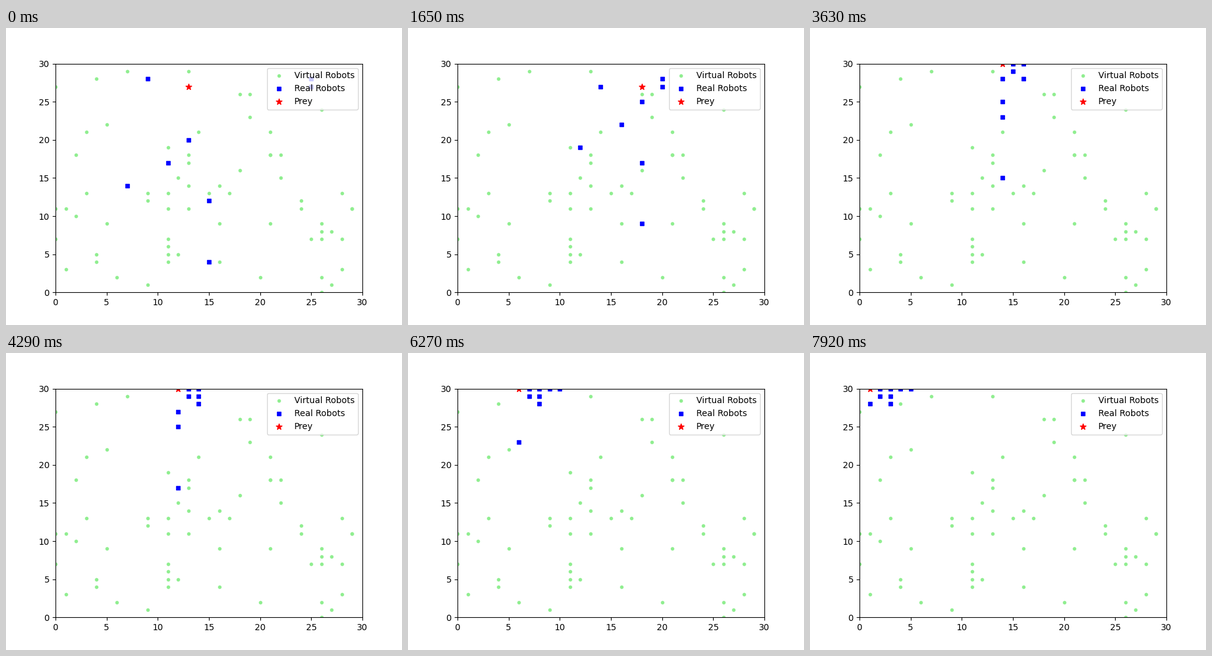
These frames come from a looping animation (640x480 px, 8000 ms). A matplotlib script:

```python
import numpy as np
import matplotlib.pyplot as plt
from matplotlib.animation import FuncAnimation

LOOP, TICK, HOLD = 8000, 40, 330   # ms
SIZE, STEPS = 30, 25

STARTS = [(9, 28), (25, 28), (25, 27), (11, 17),
          (7, 14), (15, 12), (15, 4), (13, 20)]


def prey_at(k):
    """Runs right, turns back up to the top wall, then follows it left."""
    turns = [0, 6, 9, 24]
    return (int(np.interp(k, turns, [13, 19, 16, 1])),
            int(np.interp(k, turns, [27, 27, 30, 30])))


def options(dx, dy):
    """Steps towards the prey, best first."""
    sx, sy = int(np.sign(dx)), int(np.sign(dy))
    moves = [(sx, sy)]
    if abs(dx) > abs(dy):
        moves += [(sx, 0), (0, sy)]
    elif abs(dx) < abs(dy):
        moves += [(0, sy), (sx, 0)]
    elif abs(dx) == 1:
        moves.append((0, sy))
    return moves


def hunt(robots, prey):
    """One step of the pack, nearest robot first, one robot per cell."""
    px, py = prey
    now = list(robots)

    def gap(n):
        x, y = robots[n]
        return abs(px - x) + abs(py - y)

    for n in sorted(range(len(robots)), key=gap):
        x, y = robots[n]
        for mx, my in options(px - x, py - y):
            cell = (x + mx, y + my)
            # a diagonal step may not enter a cell that was just left
            just_left = mx and my and cell in robots
            if cell != prey and cell not in now and not just_left:
                now[n] = cell
                break
    return now


path = [STARTS]
for k in range(1, STEPS):
    path.append(hunt(path[-1], prey_at(k)))

rng = np.random.default_rng(8)
virtual = rng.integers(0, SIZE, (66, 2))

fig, ax = plt.subplots(figsize=(6.4, 4.8), dpi=100)
ax.set_xlim(0, SIZE)
ax.set_ylim(0, SIZE)
ax.scatter(*virtual.T, s=10, c="lightgreen", marker="o",
           label="Virtual Robots")
robots = ax.scatter(*zip(*STARTS), s=20, c="blue", marker="s",
                    label="Real Robots")
prey = ax.scatter(*prey_at(0), s=50, c="red", marker="*", label="Prey")
ax.legend(loc="upper right")


def update(i):
    k = (i * TICK + TICK - 10) // HOLD
    robots.set_offsets(path[k])
    prey.set_offsets([prey_at(k)])
    return robots, prey


anim = FuncAnimation(fig, update, frames=LOOP // TICK, interval=TICK,
                     repeat=True, repeat_delay=0)
plt.show()
```
